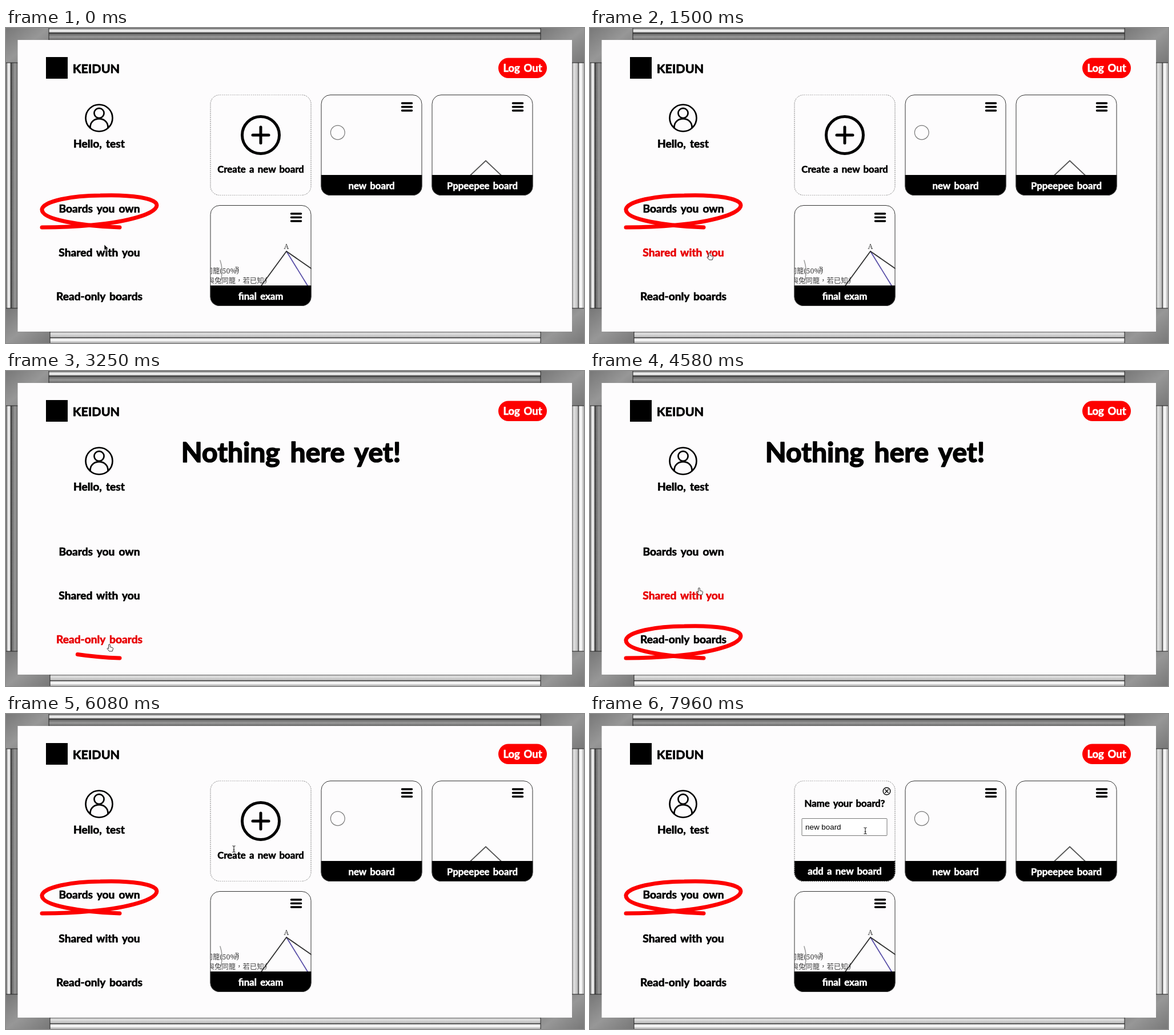
Write an HTML page that moves like this. It is 1012 px wide and 553 px high and loops after 8000 ms.

```html
<!DOCTYPE html>
<html lang="zh-Hant">
<head>
<meta charset="utf-8">
<title>Boards</title>
<style>
html, body { margin: 0; width: 100%; height: 100%; overflow: hidden; background: #fdfcfd; }
svg { display: block; width: 1012px; height: 553px; }
.hand { font-family: Lato, sans-serif; font-weight: 700; font-size: 16.8px; word-spacing: .13em;
  text-anchor: middle; stroke: currentColor; stroke-width: .035em; stroke-linejoin: round; fill: currentColor; }
.link { font-size: 19.2px; }
.white { color: #fff; }
.line { fill: none; stroke-linecap: round; stroke-linejoin: round; }
.serif { font-family: "Noto Serif", "Noto Sans CJK TC", "Noto Sans CJK JP", "Noto Sans CJK", serif; font-size: 12.4px; fill: #444; }
</style>
</head>
<body>
<svg viewBox="0 0 1012 553">
  <defs>
    <linearGradient id="rail" x2="0" y2="1">
      <stop offset="0" stop-color="#444"/><stop offset=".1" stop-color="#bbb"/>
      <stop offset=".25" stop-color="#fff"/><stop offset=".38" stop-color="#999"/>
      <stop offset=".42" stop-color="#111"/><stop offset=".48" stop-color="#666"/>
      <stop offset=".75" stop-color="#999"/><stop offset="1" stop-color="#666"/>
    </linearGradient>
    <linearGradient id="paleRail" x2="0" y2="1">
      <stop offset="0" stop-color="#777"/><stop offset=".15" stop-color="#e4e4e4"/>
      <stop offset=".48" stop-color="#bbb"/><stop offset=".53" stop-color="#222"/>
      <stop offset=".6" stop-color="#ddd"/><stop offset=".75" stop-color="#fff"/>
      <stop offset="1" stop-color="#aaa"/>
    </linearGradient>
    <linearGradient id="corner" x2="1" y2="1">
      <stop offset="0" stop-color="#777"/><stop offset=".5" stop-color="#979797"/><stop offset="1" stop-color="#777"/>
    </linearGradient>
    <clipPath id="cardClip"><rect width="177" height="177" rx="16"/></clipPath>
    <clipPath id="examClip"><rect width="99" height="141"/></clipPath>
    <g id="menu" class="line" stroke="#000" stroke-width="3.6"><path d="M142 15h17M142 21.5h17M142 28h17"/></g>
    <path id="bar" d="M0 141H177V161a16 16 0 0 1-16 16H16a16 16 0 0 1-16-16Z"/>
    <rect id="edge" width="176" height="176" x=".5" y=".5" rx="16" fill="none" stroke="#333"/>
  </defs>

  <rect width="1012" height="21" fill="url(#rail)"/>
  <rect y="533" width="1012" height="20" fill="url(#paleRail)"/>
  <rect width="553" height="21" fill="url(#rail)" transform="matrix(0 1 1 0 0 0)"/>
  <rect width="553" height="21" fill="url(#paleRail)" transform="matrix(0 1 1 0 991 0)"/>
  <g fill="url(#corner)" stroke="#222">
    <rect x="-1" y="-1" width="76" height="62"/><rect x="936" y="-1" width="77" height="62"/>
    <rect x="-1" y="492" width="78" height="62"/><rect x="936" y="492" width="77" height="62"/>
  </g>
  <rect x="20.5" y="21" width="970.5" height="512" fill="#fdfcfd"/>

  <rect x="70" y="51" width="38" height="38"/>
  <text class="hand" x="158" y="79" style="font-size:21.5px">KEIDUN</text>
  <rect x="862" y="52.5" width="85" height="35.5" rx="17.7" fill="#fd0000"/>
  <text class="hand white" x="904.5" y="77" style="font-size:18.4px">Log Out</text>

  <g class="line" stroke="#000" stroke-width="2.7">
    <circle cx="163" cy="158" r="23.5"/><circle cx="163" cy="149.5" r="8.6"/>
    <path d="M147.5 175.5C146 154 180 154 178.5 175.5"/>
  </g>
  <text class="hand link" x="163" y="210">Hello, test</text>
  <text class="hand link nav" x="163.5" y="324">Boards you own</text>
  <text class="hand link nav" x="163.5" y="401">Shared with you</text>
  <text class="hand link nav" x="163.5" y="478">Read-only boards</text>
  <path id="ring" class="line" stroke="#fd0000" stroke-width="7" pathLength="1"
    d="M199 350C165 349 130 345 105 340C80 335 62 328 63 318C66 304 115 294 165 294C220 292 264 299 264 311C264 326 215 340 150 346C120 349 90 350 63 350"/>

  <text id="empty" class="hand" x="499" y="160" style="font-size:48px">Nothing here yet!</text>

  <g id="cards">
    <g transform="translate(357.5 117)">
      <g id="create">
        <g class="line" stroke="currentColor" stroke-width="5">
          <circle cx="88.5" cy="71" r="32.5"/><path d="M74.5 71h28M88.5 57v28"/>
        </g>
        <text class="hand" x="88.5" y="137">Create a new board</text>
      </g>
      <g id="form">
        <g class="line" stroke="#000" stroke-width="1.4"><circle cx="162" cy="18.5" r="6.3"/><path d="M159.3 15.8l5.4 5.4m0-5.4l-5.4 5.4"/></g>
        <text class="hand" x="88.5" y="46">Name your board?</text>
        <rect x="13.5" y="66.5" width="149" height="30" rx="1" fill="#fff" stroke="#777"/>
        <text x="19.5" y="86" font-family="Liberation Sans, sans-serif" font-size="13.4">new board</text>
        <use href="#bar"/>
        <text class="hand white" x="88.5" y="165">add a new board</text>
      </g>
      <use href="#edge" stroke-dasharray="2 1.6"/>
      <rect width="176" height="176" x=".5" y=".5" rx="16" fill="none" stroke="#fdfcfd" stroke-dasharray="1.4 2.2"/>
    </g>
    <g transform="translate(551.5 117)">
      <circle cx="29.3" cy="66.5" r="12.4" fill="none" stroke="#777" stroke-width="1.2"/>
      <use href="#menu"/><use href="#bar"/><use href="#edge"/>
      <text class="hand white" x="88.5" y="166">new board</text>
    </g>
    <g transform="translate(745.5 117)">
      <path class="line" d="M67 142L94.5 116 122 142" stroke="#555" stroke-width="1.8"/>
      <use href="#menu"/><use href="#bar"/><use href="#edge"/>
      <text class="hand white" x="88.5" y="166">Pppeepee board</text>
    </g>
    <g transform="translate(357.5 311)">
      <g clip-path="url(#cardClip)">
        <g class="serif">
          <g clip-path="url(#examClip)">
            <text x="-8" y="120">同籠(50%)</text><text x="-5" y="136.5">與兔同籠，若已知共</text>
          </g>
          <text x="129" y="77">A</text><text x="43.5" y="116" font-size="11">B</text>
        </g>
        <path class="line" d="M17.5 97Q23 113 19 131" stroke="#999" stroke-width="1.5"/>
        <path class="line" d="M133.5 81L171 142" stroke="#5a50a8" stroke-width="1.8"/>
        <path class="line" d="M89 142L133.5 81 178 112" stroke="#333" stroke-width="1.9"/>
      </g>
      <use href="#menu"/><use href="#bar"/><use href="#edge"/>
      <text class="hand white" x="88.5" y="166">final exam</text>
    </g>
  </g>

  <path id="cursor" stroke-linejoin="round"/>
</svg>
<script>
const LOOP = 8000, DRAW_TIME = 800;
const $ = id => document.getElementById(id);
const links = document.querySelectorAll('.nav');
const clicks = [[-DRAW_TIME, 0], [1850, 1], [3070, 2], [4940, 0]];

// time, x, y of the pointer
const route = [[0, 172, 380], [450, 178, 390], [1050, 190, 468], [1500, 209, 395], [2150, 209, 395],
  [2900, 181, 480], [4050, 181, 480], [4580, 191, 381], [4880, 187, 317], [5250, 187, 317],
  [6080, 399, 237], [6600, 510, 240], [7000, 510, 240], [7700, 482, 205], [LOOP, 482, 205]];

const shapes = {
  arrow: ['M0 0V10.5L2.4 8.2 4.2 12 5.9 11.3 4.2 7.6H7.4Z', '#000', '#fff', .7],
  hand: ['M-1.3 1a1.3 1.3 0 0 1 2.6 0V4.6L5.6 5.6Q6.7 6 6.4 8L5.2 12H-.2L-3.8 7.6Q-3.8 6-2.2 6.7L-1.3 7.6Z', '#fff', '#333', 1],
  beam: ['M-2.6-5.5Q0-5.5 0-4Q0-5.5 2.6-5.5M0-4V4M-2.6 5.5Q0 5.5 0 4Q0 5.5 2.6 5.5M-1.3 1.5H1.3', 'none', '#222', 1.1]
};

const smooth = u => (u = Math.min(1, Math.max(0, u)), u * u * (3 - 2 * u));
const show = (id, on) => $(id).style.display = on ? '' : 'none';

function pointer(t) {
  const i = route.findIndex(p => p[0] > t);
  const [t0, x0, y0] = route[i - 1], [t1, x1, y1] = route[i];
  const k = smooth((t - t0) / (t1 - t0));
  return [x0 + (x1 - x0) * k, y0 + (y1 - y0) * k];
}

function render(t) {
  const [x, y] = pointer(t);
  const [start, tab] = clicks.filter(c => c[0] <= t).pop();
  const hasCards = t < 1900 || t >= 5060;
  const formOpen = t >= 6950, createHover = t >= 6350 && !formOpen;

  let hovering = createHover;
  links.forEach((link, i) => {
    const top = 303.4 + 77 * i;
    const on = x > 85 && x < 242 && y > top && y < top + 30;
    link.style.color = on ? '#e80004' : '#000';
    hovering ||= on;
  });

  const drawn = smooth((t - start) / DRAW_TIME);
  show('ring', drawn > 0);
  $('ring').setAttribute('transform', `translate(0 ${77 * tab})`);
  $('ring').setAttribute('stroke-dasharray', drawn < 1 ? `${drawn} 2` : 'none');

  show('cards', hasCards);
  show('empty', !hasCards);
  show('create', !formOpen);
  show('form', formOpen);
  $('create').style.color = createHover ? '#f40000' : '#000';

  const overText = x > 370 && x < 521 && (formOpen ? y > 183 && y < 214 : y > 230 && y < 262);
  const [d, fill, stroke, width] = shapes[hovering ? 'hand' : overText ? 'beam' : 'arrow'];
  const attrs = { d, fill, stroke, 'stroke-width': width, transform: `translate(${x} ${y})` };
  for (const name in attrs) $('cursor').setAttribute(name, attrs[name]);
}

function tick() {
  render(performance.now() % LOOP);
  requestAnimationFrame(tick);
}
tick();
</script>
</body>
</html>
```
